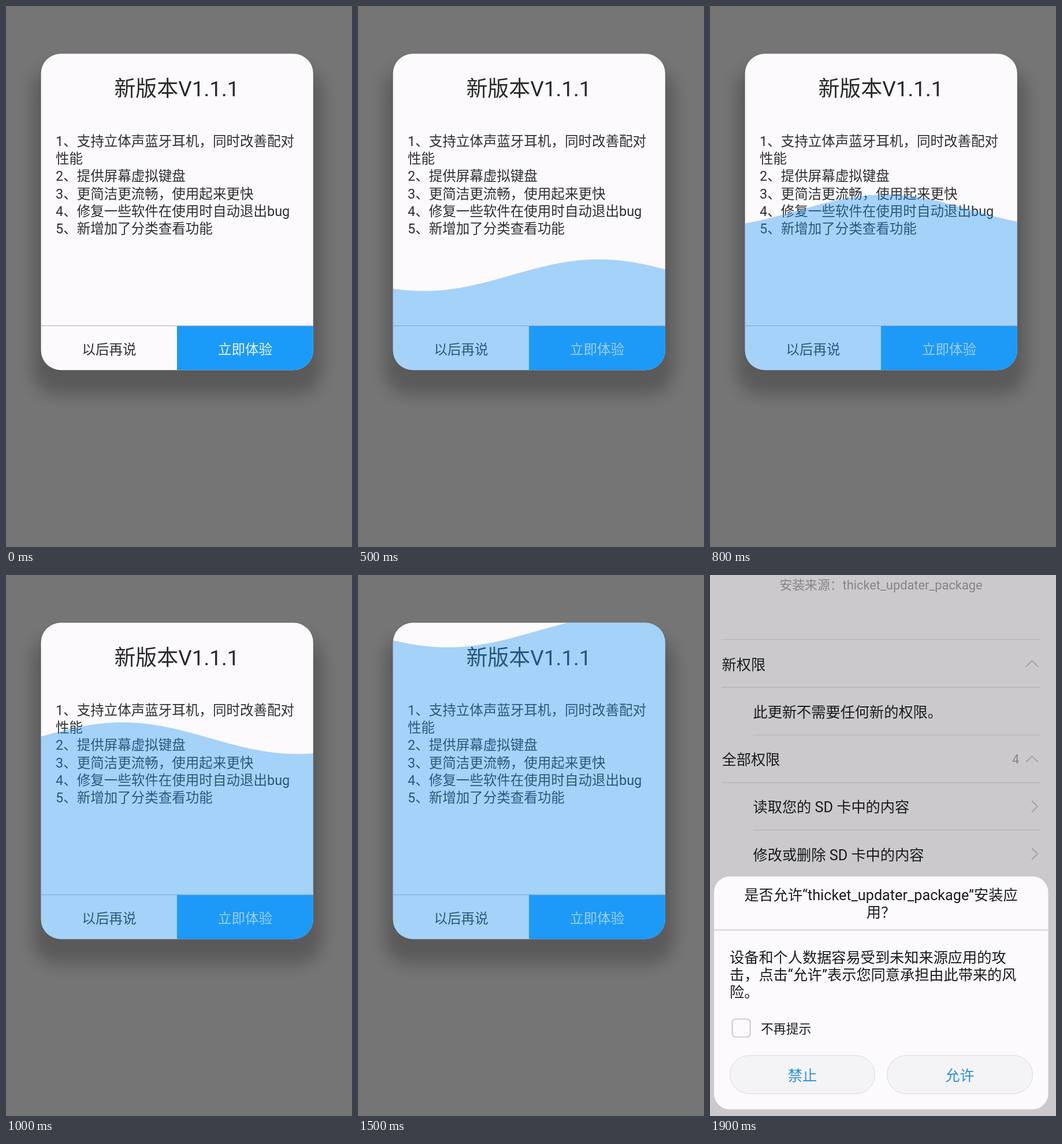
Recreate the animation shown at these times as an HTML page. Size 599 by 935 pixels, loop 2 s.

```html
<!DOCTYPE html>
<html lang="zh-CN">
<head>
<meta charset="utf-8">
<title>版本更新</title>
<style>
  html, body { margin: 0; width: 100%; height: 100%; overflow: hidden; background: #757575; }
  svg { display: block; width: 599px; height: 935px; }
  text { font: 25.2px Roboto, "Noto Sans CJK SC", "Noto Sans CJK", sans-serif; fill: #1a1a1b; white-space: pre; }
  .title { font-size: 36.96px; fill: #29292a; }
  .note { font-size: 23.52px; fill: #2e2e2f; }
  .small { font-size: 21.84px; }
  .gray { fill: #858487; }
  .mid { text-anchor: middle; }
  .link { fill: #2a8fe2; }
  .shadow { filter: blur(14px); opacity: .23; }
  .rules { stroke: #b9b8bb; stroke-width: 1.3; }
  .arrows { fill: none; stroke: #a3a2a5; stroke-width: 1.8; }
  .pill { fill: #f4f3f6; stroke: #dad9dc; }
</style>
</head>
<body>
<svg viewBox="0 0 599 935">
  <defs>
    <clipPath id="cardShape"><rect x="60.6" y="82.6" width="471.2" height="546.6" rx="34"/></clipPath>
  </defs>

  <g id="update">
    <rect width="599" height="935" fill="#757575"/>
    <rect class="shadow" x="46" y="106" width="501" height="566" rx="44"/>
    <g clip-path="url(#cardShape)">
      <rect x="60" y="82" width="473" height="548" fill="#fcfafd"/>
      <rect x="296" y="553" width="237" height="77" fill="#1a9bf9"/>
      <path d="M60 552.7H533" stroke="#bdbcbf" stroke-width="1.3"/>
      <text class="title mid" x="295.5" y="155.5">新版本V1.1.1</text>
      <g id="notes"></g>
      <text class="note mid" x="178.5" y="602">以后再说</text>
      <text class="note mid" x="414" y="602" style="fill:#eef5fd">立即体验</text>
      <path id="wave" fill="#2196f3" fill-opacity=".4"/>
    </g>
  </g>

  <g id="install">
    <rect id="dim" width="599" height="935"/>
    <text class="small gray mid" x="296" y="24.5">安装来源：thicket_updater_package</text>
    <path class="rules" d="M20 111.5H572M20 194H572M75 276.5H572M20 359H572M75 441H572"/>
    <path class="arrows" d="M547 158.5l10.5-10.5 10.5 10.5M547 323.5l10.5-10.5 10.5 10.5M557 390l10 10-10 10M557 472l10 10-10 10"/>
    <text x="20.5" y="163.5">新权限</text>
    <text x="74.5" y="246">此更新不需要任何新的权限。</text>
    <text x="20.5" y="328">全部权限</text>
    <text class="small gray" x="523" y="326">4</text>
    <text x="74.5" y="410">读取您的 SD 卡中的内容</text>
    <text x="74.5" y="492.5">修改或删除 SD 卡中的内容</text>

    <rect x="7" y="521" width="578.5" height="402.5" rx="27" fill="#fcfafd"/>
    <text class="mid" x="296" y="562">是否允许“thicket_updater_package”安装应</text>
    <text class="mid" x="296" y="592">用？</text>
    <path d="M7 613.5H585.5" stroke="#dddcdf" stroke-width="3"/>
    <text x="34" y="670">设备和个人数据容易受到未知来源应用的攻</text>
    <text x="34" y="700">击，点击“允许”表示您同意承担由此带来的风</text>
    <text x="34" y="729.5">险。</text>
    <rect x="38.5" y="767.5" width="31" height="31" rx="5.5" fill="#fcfafd" stroke="#c2c1c4" stroke-width="1.7"/>
    <text class="small" x="88" y="792">不再提示</text>
    <rect class="pill" x="34.5" y="830.5" width="251" height="66" rx="33"/>
    <rect class="pill" x="306.5" y="830.5" width="252" height="66" rx="33"/>
    <text class="link mid" x="160" y="873.5">禁止</text>
    <text class="link mid" x="432.5" y="873.5">允许</text>
  </g>
</svg>

<script>
const $ = id => document.getElementById(id);
const LOOP = 2000, STEP = 100, INSTALL_AT = 1600;
const CARD = { left: 60, top: 83, right: 533, bottom: 629 };
const HEIGHT = CARD.bottom - CARD.top;
const DP = 1.68;

// [time in ms, download progress, wave cycles]
const KEYS = [
  [100, .027, .2],
  [500, .3, 1.405],
  [800, .505, 2.272],
  [1200, .766, 3.551],
  [1500, .973, 4.446]
];

$('notes').innerHTML = [
  '1、支持立体声蓝牙耳机，同时改善配对',
  '性能',
  '2、提供屏幕虚拟键盘',
  '3、更简洁更流畅，使用起来更快',
  '4、修复一些软件在使用时自动退出bug',
  '5、新增加了分类查看功能'
].map((line, i) => `<text class="note" x="86" y="${241.8 + i * 30.25}">${line}</text>`).join('');

function sample(time) {
  const i = Math.max(1, KEYS.findIndex(key => key[0] >= time));
  const a = KEYS[i - 1], b = KEYS[i];
  const mix = (time - a[0]) / (b[0] - a[0]);
  return [1, 2].map(k => a[k] + (b[k] - a[k]) * mix);
}

// cubic-bezier(.42, 0, .58, 1)
function easeInOut(x) {
  let low = 0, high = 1;
  for (let i = 0; i < 20; i++) {
    const s = (low + high) / 2, r = 1 - s;
    if (1.26 * r * r * s + 1.74 * r * s * s + s * s * s < x) low = s; else high = s;
  }
  return low * low * (3 - 2 * low);
}

function wavePath(progress, cycles) {
  const turn = easeInOut(cycles % 1) * 360;
  const level = CARD.bottom - HEIGHT * progress;
  let d = `M${CARD.left} ${CARD.bottom + 1}`;
  for (let x = CARD.left; x < CARD.right + 3; x += 3) {
    const angle = (turn - (x - CARD.left) / DP) * Math.PI / 180;
    d += `L${x} ${(level + Math.sin(angle) * HEIGHT / 20).toFixed(2)}`;
  }
  return d + `V${CARD.bottom + 1}Z`;
}

function draw(now) {
  const time = Math.floor(now % LOOP / STEP) * STEP;
  const installing = time >= INSTALL_AT;
  $('update').style.display = installing ? 'none' : '';
  $('install').style.display = installing ? '' : 'none';
  $('dim').setAttribute('fill', time > INSTALL_AT ? '#cbc9cc' : '#cfced1');
  if (!installing) $('wave').setAttribute('d', time ? wavePath(...sample(time)) : '');
}

let start;
function tick(now) {
  start ??= now;
  draw(now - start);
  requestAnimationFrame(tick);
}
draw(0);
requestAnimationFrame(tick);
</script>
</body>
</html>
```
